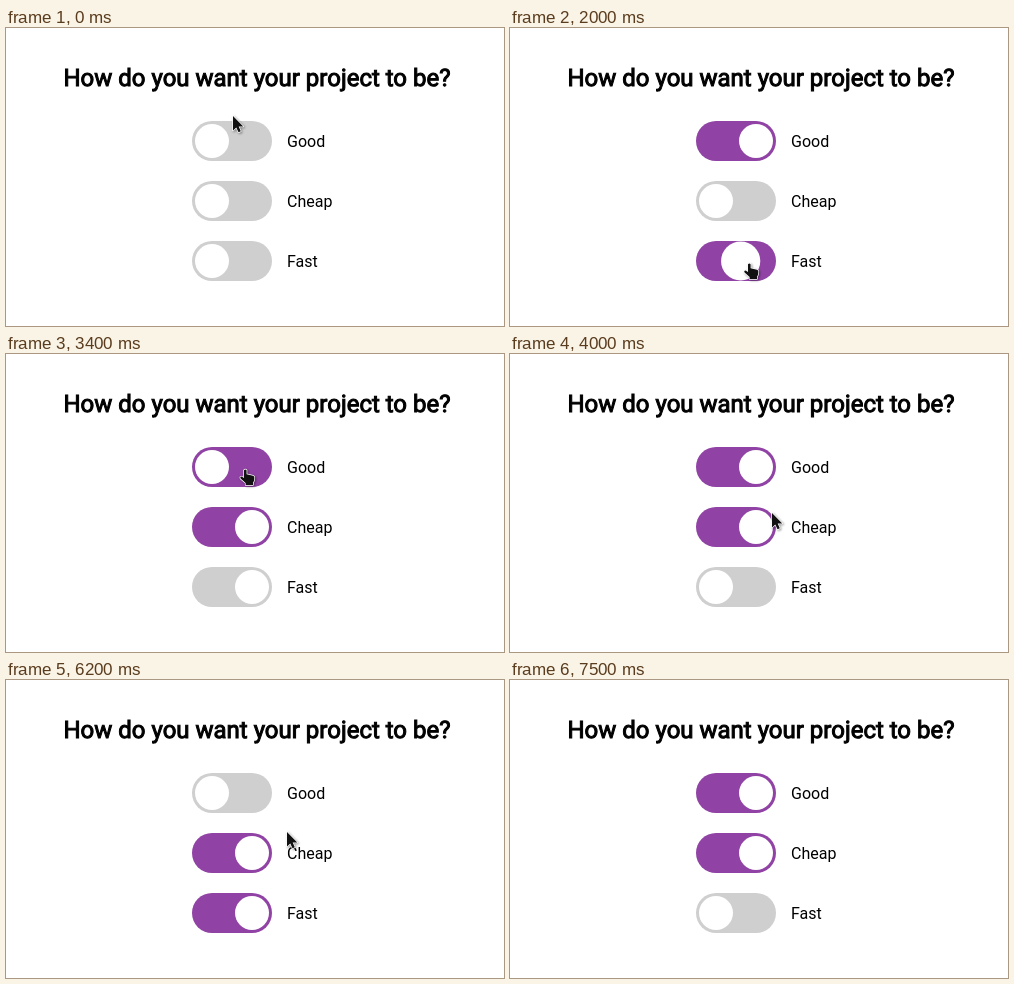
An HTML page that plays this animation: 498x298 px, repeating every 7800 ms.

```html
<!DOCTYPE html>
<html lang="en">
<head>
<meta charset="utf-8">
<title>Good, cheap, fast</title>
<style>
  html, body { margin: 0; width: 100%; height: 100%; overflow: hidden; background: #fff; }
  svg { display: block; width: 498px; height: 298px; font: 16px Roboto, sans-serif; }
  .title { font-size: 24px; stroke: #000; stroke-width: 1px; text-rendering: geometricPrecision; }
  .cursor { fill: #111; stroke: #fff; stroke-width: 1.4px; stroke-linejoin: round; paint-order: stroke;
            filter: drop-shadow(1px 1px 1px rgba(0, 0, 0, .4)); }
</style>
</head>
<body>
<svg viewBox="0 0 498 298">
  <text class="title" x="57.5" y="57.5">How do you want your project to be?</text>
  <g id="rows"></g>
  <g id="cursor" class="cursor">
    <path id="arrow" d="M1 1V15.5l3.3-3 2.2 4.8 2.3-1-2.1-4.7h4.6z"/>
    <path id="hand" d="M-1 1.2q1.3-1.6 2.6 0V5.3L8 6.8q1.5.4 1.4 2L9 12l-1 1.6V16H.6v-2l-5-4.4q-1-2 1-2L-1 9z"/>
  </g>
</svg>
<script>
const LOOP = 7800, STEP = 100, POINTER_GONE = 7500;
const SLIDE = 300, SLIDE_DELAY = 15;
const OFF_X = 206, ON_X = 246, RADIUS = 20;
const ON_COLOR = '#9043a4', OFF_COLOR = '#cfcfcf';
const LINGER = 310, ARRIVE_EARLY = 100, BOW = 8;

const byId = id => document.getElementById(id);
const clamp = (v, lo, hi) => Math.min(hi, Math.max(lo, v));
const mix = (a, b, p) => a + (b - a) * p;

function set(node, attrs) {
  for (const key in attrs) node.setAttribute(key, attrs[key]);
}

function add(name, attrs) {
  const node = document.createElementNS('http://www.w3.org/2000/svg', name);
  set(node, attrs);
  return byId('rows').appendChild(node);
}

const rows = ['Good', 'Cheap', 'Fast'].map((label, i) => {
  const y = 113 + 60 * i;
  const track = add('rect', { x: 186, y: y - RADIUS, width: 80, height: 40, rx: RADIUS });
  const ball = add('circle', { cy: y, fill: '#fff' });
  add('text', { x: 281, y: y + 6 }).textContent = label;
  return { y, track, ball };
});

// The pointer clicks Good, Fast, Cheap in turn; each click releases the older of the two switches still on.
const [good, cheap, fast] = rows;
const order = [good, fast, cheap];
const clicks = [680, 1800, 2420, 3390, 4635, 5695, 6590].map((at, i) =>
  ({ at, row: order[i % 3], released: i > 1 ? order[(i - 2) % 3] : null }));

// Places where the pointer rests; it bows out to the right on the way to the next one.
const rests = [
  { at: -LINGER + 200, x: 226, y: 87 },
  ...clicks.map(({ at, row }) => ({ at, x: 239, y: row.y + 2 })),
  { at: 7400, x: 188, y: 12 }
];
rests[4].bow = 24;
rests[6].bow = 43;

function drawSwitch(row, t) {
  const last = clicks.findLast(c => c.at <= t && (c.row === row || c.released === row));
  const on = last?.row === row;
  const p = last ? clamp((t - last.at - SLIDE_DELAY) / SLIDE, 0, 1) : 1;
  const swell = 1 + 0.2 * (1 - Math.abs(2 * p - 1));
  set(row.track, { fill: on ? ON_COLOR : OFF_COLOR });
  set(row.ball, { cx: on ? mix(OFF_X, ON_X, p) : mix(ON_X, OFF_X, p), r: 17 * swell });
}

function pointerAt(t) {
  const i = rests.findLastIndex(rest => rest.at <= t);
  const from = rests[i], to = rests[i + 1] ?? from;
  const leave = from.at + LINGER, arrive = to.at - ARRIVE_EARLY;
  const p = to === from ? 0 : clamp((t - leave) / (arrive - leave), 0, 1);
  const bow = (from.bow ?? BOW) * Math.sin(Math.PI * p);
  return [mix(from.x, to.x, p) + bow, mix(from.y, to.y, p)];
}

function drawPointer(t) {
  const [x, y] = pointerAt(t);
  const over = rows.some(row => Math.hypot(x - clamp(x, OFF_X, ON_X), y - row.y) <= RADIUS);
  set(byId('cursor'), {
    transform: `translate(${Math.round(x)} ${Math.round(y)})`,
    visibility: t < POINTER_GONE ? 'visible' : 'hidden'
  });
  set(byId('hand'), { display: over ? 'inline' : 'none' });
  set(byId('arrow'), { display: over ? 'none' : 'inline' });
}

const start = performance.now();
function frame() {
  // The picture advances ten times a second.
  const t = Math.floor((performance.now() - start) % LOOP / STEP) * STEP;
  rows.forEach(row => drawSwitch(row, t));
  drawPointer(t);
  requestAnimationFrame(frame);
}
frame();
</script>
</body>
</html>
```
